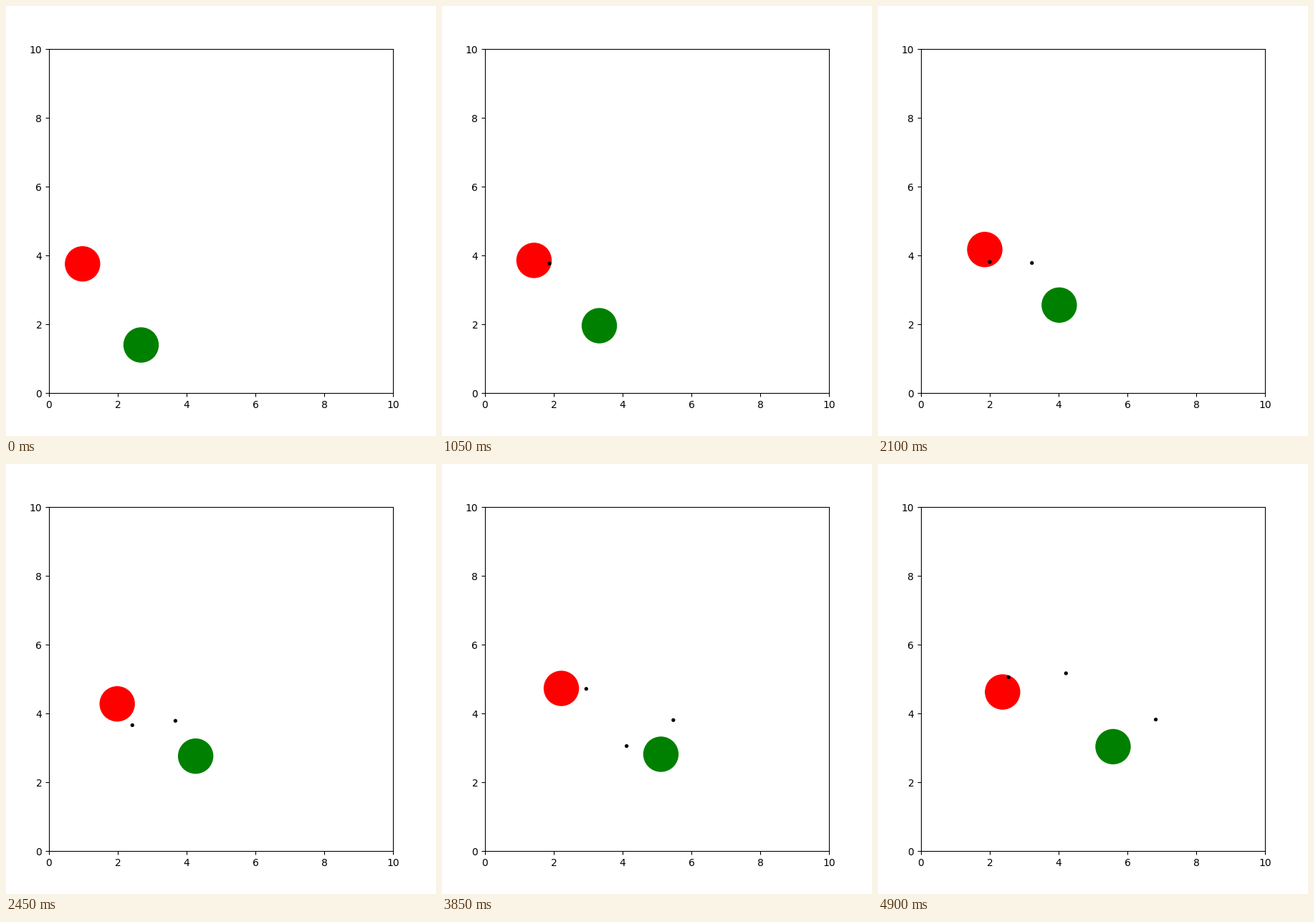
A matplotlib script for the animation above (5.25 s loop, 600 by 600 pixels).

```python
import numpy as np
import matplotlib.pyplot as plt
from matplotlib.animation import FuncAnimation

FRAMES, INTERVAL = 15, 350
RADIUS, SHOT_RADIUS = 0.5, 0.04
SHOT_SPEED, SHOT_GAP = 0.45, 4
SHOT_ANGLES = np.radians([0.66, -19.7, 19.6, 45])

# Both discs run straight between a few turning points.
TURNS = [0, 2, 5, 7, 9, 11, 13, 14]
HUNTER_X = [0.975, 1.275, 1.725, 1.983, 2.208, 2.219, 2.238, 2.371]
HUNTER_Y = [3.754, 3.750, 4.066, 4.277, 4.546, 4.727, 4.742, 4.623]
PREY_X = [2.677, 3.098, 3.775, 4.263, 4.704, 5.113, 5.429, 5.583]
PREY_Y = [1.396, 1.758, 2.354, 2.758, 2.933, 2.813, 2.875, 3.033]


def hunter_at(step):
    return np.array([np.interp(step, TURNS, HUNTER_X),
                     np.interp(step, TURNS, HUNTER_Y)])


def prey_at(step):
    return np.array([np.interp(step, TURNS, PREY_X),
                     np.interp(step, TURNS, PREY_Y)])


fig, ax = plt.subplots(figsize=(6, 6), dpi=100)
fig.subplots_adjust(left=0.1, right=0.9, bottom=0.1, top=0.9)
ax.set(xlim=(0, 10), ylim=(0, 10))


def add_disc(radius, color):
    return ax.add_patch(plt.Circle((0, 0), radius, color=color))


hunter = add_disc(RADIUS, "red")
prey = add_disc(RADIUS, "green")
shots = [add_disc(SHOT_RADIUS, "black") for _ in SHOT_ANGLES]


def update(frame):
    hunter.center = hunter_at(frame)
    prey.center = prey_at(frame)
    # Shots leave the hunter at regular steps and vanish inside the prey.
    for i, (shot, angle) in enumerate(zip(shots, SHOT_ANGLES)):
        fired = i * SHOT_GAP
        age = frame - fired - 1
        heading = np.array([np.cos(angle), np.sin(angle)])
        shot.center = hunter_at(fired) + SHOT_SPEED * age * heading
        hit = np.hypot(*(shot.center - prey.center)) < RADIUS
        shot.set_visible(age >= 0 and not hit)
    return hunter, prey, *shots


anim = FuncAnimation(fig, update, frames=FRAMES, interval=INTERVAL,
                     repeat=True, repeat_delay=0)
plt.show()
```
